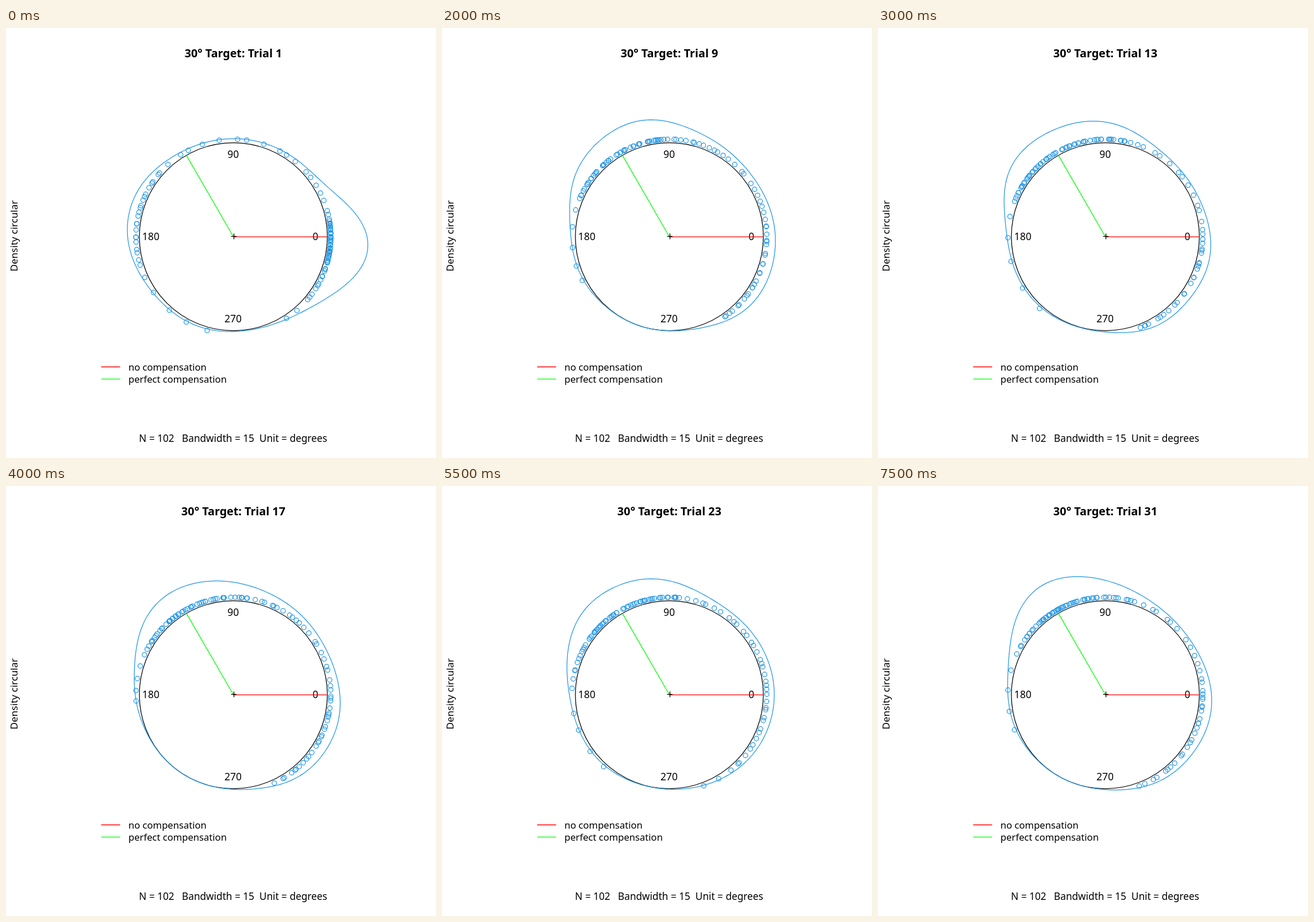
An HTML page with a canvas for the animation above (8 s loop, 748 by 748 pixels).

```html
<!DOCTYPE html>
<html lang="en">
<head>
<meta charset="utf-8">
<title>Circular density by trial</title>
<style>
html, body { margin: 0; width: 100%; height: 100%; overflow: hidden; background: #fff; }
canvas { display: block; }
</style>
</head>
<body>
<canvas id="stage" width="748" height="748"></canvas>
<script>
const ctx = document.getElementById('stage').getContext('2d');
const CX = 395.5, CY = 363, R = 163.5, DOT_R = 169.5;
const BLUE = '#2297e6', FONT = '"Noto Sans", "Open Sans", sans-serif';
const STEP = 500, COUNT = 16, DOTS = 102, KAPPA = 15, GAIN = 1.03;

// Angle in degrees reached at each rank of the sorted dots, for a few key trials.
const RANKS = [0, 3, 14, 26, 38, 50, 58, 66, 75, 86, 97, 102];
const KEYS = {
  1: [-62, -38, -16.5, -9, -2, 5.5, 12, 58, 138, 167.5, 197, 260],
  3: [-62, -54, -18.5, 8.5, 62, 108, 125, 137, 148, 164, 195, 262],
  5: [-62, -56.5, -17.5, 9, 72, 108, 118, 127, 136.5, 152.5, 190, 262],
  9: [-57, -51, -21.5, 11, 62, 93.5, 101.5, 112, 123.5, 140.5, 158, 214],
  13: [-72, -64, -25, 5, 75, 93, 106.5, 117, 131, 144, 158.5, 234],
  19: [-61, -51.5, -27, -2.5, 36, 80, 93.5, 108, 118, 130, 150, 164],
  23: [-74, -48, -8, 30, 82, 101, 110, 121.5, 133.5, 144.5, 170, 234],
  31: [-73, -58, -21, 7, 70, 98, 106.5, 115.5, 123, 132, 151, 205]
};

const rad = deg => deg * Math.PI / 180;
const polar = (deg, r) => [CX + r * Math.cos(rad(deg)), CY - r * Math.sin(rad(deg))];

// Piecewise linear value of ys over xs at x.
function lerpAt(xs, ys, x) {
  const i = Math.max(1, xs.findIndex(v => v >= x));
  const t = (x - xs[i - 1]) / (xs[i] - xs[i - 1]);
  return ys[i - 1] + (ys[i] - ys[i - 1]) * t;
}

function random(seed) {
  return () => {
    seed = (seed * 16807) % 2147483647;
    return seed / 2147483647;
  };
}

// Trials between two key trials blend their rank curves.
function makeDots(trial) {
  const ids = Object.keys(KEYS).map(Number);
  const curve = RANKS.map((_, k) => lerpAt(ids, ids.map(id => KEYS[id][k]), trial));
  const rnd = random(trial * 97711);
  return Array.from({ length: DOTS },
    (_, i) => lerpAt(RANKS, curve, i + 0.5) + (rnd() - 0.5) * 4);
}

// Von Mises kernel density, as a fraction of the circle's radius.
function density(dots, deg) {
  const sum = dots.reduce((s, d) => s + Math.exp(KAPPA * (Math.cos(rad(deg - d)) - 1)), 0);
  return GAIN * sum / dots.length;
}

function line(x1, y1, x2, y2, color) {
  ctx.strokeStyle = color;
  ctx.lineWidth = 1.3;
  ctx.beginPath();
  ctx.moveTo(x1, y1);
  ctx.lineTo(x2, y2);
  ctx.stroke();
}

function ring(x, y, r, color) {
  ctx.strokeStyle = color;
  ctx.lineWidth = 1.25;
  ctx.beginPath();
  ctx.arc(x, y, r, 0, 2 * Math.PI);
  ctx.stroke();
}

function label(str, x, y, size, align = 'center', weight = 400) {
  ctx.font = `${weight} ${size}px ${FONT}`;
  ctx.textAlign = align;
  ctx.fillStyle = '#000';
  ctx.fillText(str, x, y);
}

function densityCurve(dots) {
  ctx.strokeStyle = BLUE;
  ctx.lineWidth = 1.25;
  ctx.beginPath();
  for (let a = 0; a < 360; a += 1.5) ctx.lineTo(...polar(a, R * (1 + density(dots, a))));
  ctx.closePath();
  ctx.stroke();
}

function legend(str, y, color) {
  line(165.5, y, 198.5, y, color);
  label(str, 213, y + 6.2, 16.6, 'left');
}

function draw(trial) {
  const dots = makeDots(trial);
  ctx.fillStyle = '#fff';
  ctx.fillRect(0, 0, 748, 748);

  label(`30° Target: Trial ${trial}`, CX, 50.5, 19.7, 'center', 700);
  label('N = 102   Bandwidth = 15  Unit = degrees', 395, 720, 17.2);
  ctx.save();
  ctx.translate(19.5, 361.5);
  ctx.rotate(-Math.PI / 2);
  label('Density circular', 0, 0, 17.1);
  ctx.restore();

  ring(CX, CY, R, '#000');
  label('0', 538.3, 369.2, 17.4);
  label('90', 395.3, 226, 17.4);
  label('180', 252, 369.2, 17.4);
  label('270', 395, 512.3, 17.4);

  dots.forEach(d => ring(...polar(d, DOT_R), 4, BLUE));
  densityCurve(dots);

  line(CX, CY + 0.3, CX + R, CY + 0.3, '#f00');
  line(CX, CY, ...polar(120, R), '#0f0');
  line(391.5, 362.5, 401, 362.5, '#000');
  line(396.5, 357.5, 396.5, 367.5, '#000');

  legend('no compensation', 589.5, '#f00');
  legend('perfect compensation', 610.7, '#0f0');
}

const start = performance.now();
let shown = -1;
function tick() {
  const step = Math.floor((performance.now() - start) / STEP) % COUNT;
  if (step !== shown) {
    shown = step;
    draw(1 + 2 * step);
  }
  requestAnimationFrame(tick);
}
tick();
</script>
</body>
</html>
```
